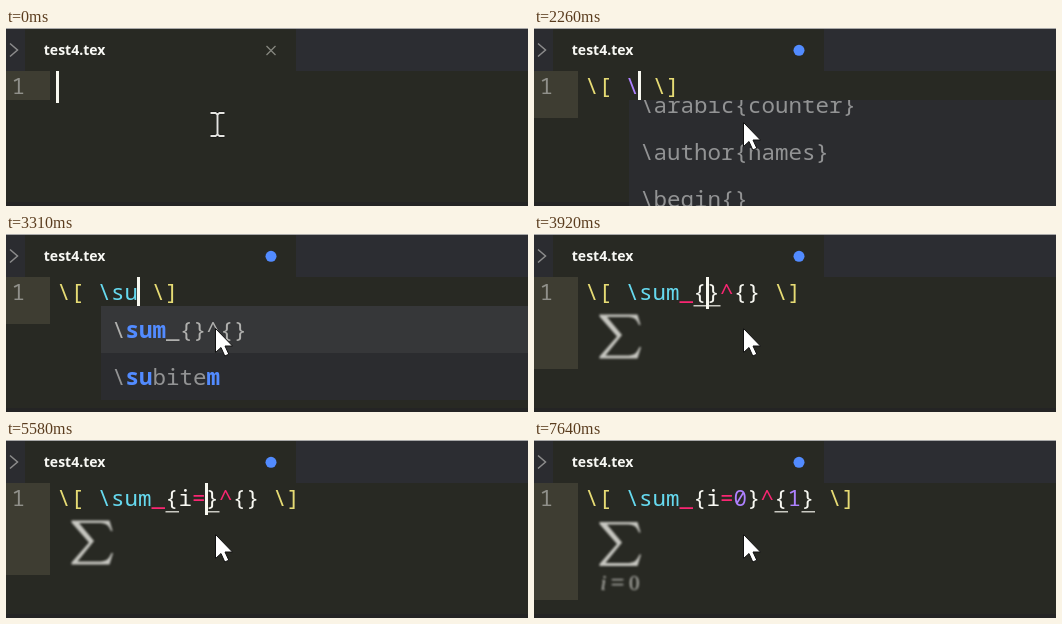
An HTML page that plays this animation: 522x178 px, repeating every 8 s.

```html
<!DOCTYPE html>
<html lang="en">
<head>
<meta charset="utf-8">
<title>Editor typing a sum</title>
<style>
  html, body { margin: 0; width: 100%; height: 100%; overflow: hidden; background: #282923; }
  svg { display: block; }
  text { white-space: pre; }
  .code { font: 500 22.5px "Noto Sans Mono", "DejaVu Sans Mono", monospace; }
  .tab { font: bold 14px "Open Sans", "Noto Sans", sans-serif; fill: #f8f8f4; }
  .hit { font-weight: bold; fill: #528bff; }
  .math { font: 21px "Liberation Serif", "Noto Serif", serif; fill: #bcbcb6; }
  .soft { filter: blur(.8px); }
</style>
</head>
<body>
<svg width="522" height="178" viewBox="0 0 522 178">
  <rect width="522" height="178" fill="#282923"/>
  <rect y="174" width="522" height="4" fill="#242424"/>
  <rect width="19" height="43" fill="#2b2c30"/>
  <rect x="290" width="232" height="43" fill="#2c2d32"/>
  <rect width="522" height="1" fill="#a8a8a8"/>
  <path d="M4 15.5 L11.5 22 L4 28.5" fill="none" stroke="#8c8c8c" stroke-width="1.5"/>
  <text class="tab" x="37.8" y="27">test4.tex</text>
  <path id="close" d="M260.5 18 L269.5 27 M269.5 18 L260.5 27" stroke="#85867f" stroke-width="1.3"/>
  <circle id="dot" cx="265" cy="22.3" r="5.5" fill="#528bff"/>
  <rect id="gutter" y="43" width="44" fill="#3e3d32"/>
  <text class="code" x="5.5" y="65.5" fill="#90908a">1</text>
  <g id="line" class="code"></g>
  <g id="marks" fill="#c9c9c2"></g>
  <rect id="caret" y="43" width="3" height="32" fill="#f8f8f0"/>
  <g id="sum" class="soft">
    <path fill="#c6c6c0" d="M65.5 80.5 H103.5 L106.5 91 H105 C102.5 84.5 99.5 83 91.5 83 H73 L88 101 L71.5 121.5 H92.5 C100.5 121.5 102.5 119.5 105.5 113 H107 L103.5 124.5 H65.5 V122.5 L83 102.5 L65.5 82.5 Z"/>
  </g>
  <g id="limit" class="math soft">
    <text x="66.5" y="150" font-style="italic">i</text>
    <text x="76.5" y="151" font-size="25">=</text>
    <text x="95" y="150">0</text>
  </g>
  <g id="popup"></g>
  <g id="beam" fill="none" transform="translate(-.5 -.5)">
    <path d="M205 85.5 H210 L212 87 L214 85.5 H219 M212 87 V107 M205 108.5 H210 L212 107 L214 108.5 H219" stroke="#111" stroke-width="3"/>
    <path d="M205 85.5 H210 L212 87 L214 85.5 H219 M212 87 V107 M205 108.5 H210 L212 107 L214 108.5 H219" stroke="#e4e4e0" stroke-width="2"/>
  </g>
  <path id="arrow" d="M209.5 94.5 V118.5 L215 113.5 L218.8 122 L222.8 120.2 L219 112 H226.5 Z" fill="#fff" stroke="#111" stroke-width="1"/>
</svg>
<script>
const LOOP = 8000, CELL = 13.5, LEFT = 51, ROW = 47;
const $ = id => document.getElementById(id);
const show = (id, on) => $(id).setAttribute("visibility", on ? "visible" : "hidden");

const all = { rows: ["\\arabic{counter}", "\\author{names}", "\\begin{}"], key: "", base: 85 };
const forS = { rows: ["\\samepage", "\\scriptsize", "\\section{}"], key: "s", base: 85 };
const forSu = { rows: ["\\subitem", "\\subsubsection[short]{title}", "\\subsection{}"], key: "su", base: 85 };
const forSum = { rows: ["\\sum_{}^{}", "\\subitem"], key: "sum", base: 104, picked: true };

// Each step changes only the listed parts of the state.
const steps = [
  [0, { line: "", at: 0, caret: 1, dirty: false, arrow: false, popup: null, bottom: 72, marks: [], sum: false, limit: false }],
  [450, { line: "\\", at: 1, dirty: true }],
  [520, { popup: all, arrow: true }],
  [740, { line: "\\[\\]", at: 2, popup: null, arrow: false }],
  [1120, { caret: .7 }],
  [1200, { line: "\\[ \\]", at: 3, caret: 1 }],
  [1510, { line: "\\[  \\]", at: 4 }],
  [1740, { at: 3 }],
  [2110, { line: "\\[ \\ \\]", at: 4 }],
  [2180, { popup: all, arrow: true }],
  [2260, { bottom: 90 }],
  [2560, { line: "\\[ \\s \\]", at: 5, popup: forS }],
  [2950, { caret: .7 }],
  [3020, { popup: forSu, caret: 1 }],
  [3090, { line: "\\[ \\su \\]", at: 6 }],
  [3310, { popup: forSum }],
  [3390, { line: "\\[ \\sum \\]", at: 7 }],
  [3710, { line: "\\[ \\sum_{}^{} \\]", at: 9, popup: null }],
  [3800, { marks: [8, 9] }],
  [3900, { sum: true, bottom: 135 }],
  [4380, { caret: .75 }], [4460, { caret: .5 }], [4530, { caret: .25 }], [4610, { caret: 0 }],
  [4990, { caret: .4 }], [5080, { caret: 1 }],
  [5190, { line: "\\[ \\sum_{i}^{} \\]", at: 10, marks: [8, 10] }],
  [5580, { line: "\\[ \\sum_{i=}^{} \\]", at: 11, marks: [8, 11] }],
  [5810, { line: "\\[ \\sum_{i=0}^{} \\]", at: 12, marks: [8, 12] }],
  [6180, { caret: .7 }], [6260, { caret: .35 }],
  [6410, { caret: 0, limit: true, bottom: 160 }],
  [6730, { caret: 1, at: 15, marks: [14, 15] }],
  [7100, { line: "\\[ \\sum_{i=0}^{1} \\]", at: 16 }],
  [7190, { marks: [14, 16] }],
  [7500, { caret: .65 }], [7570, { caret: .3 }], [7640, { caret: 0 }]
];

let last = {};
const states = steps.map(([time, change]) => (last = { ...last, ...change, time }));

function colour(token, start) {
  if (/^\\[[\]]/.test(token)) return "#e6db74";
  if (/^\\[a-z]/.test(token)) return "#66d9ef";
  if (/[_^=]/.test(token)) return "#f92672";
  if (/\d/.test(token) || (token === "\\" && start)) return "#ae81ff";
  return "#f8f8f2";
}

function lineMarkup(line) {
  return [...line.matchAll(/\\[[\]]|\\[a-z]+|\S/g)].map(m =>
    `<text x="${LEFT + m.index * CELL}" y="65.5" fill="${colour(m[0], m.index)}">${m[0]}</text>`).join("");
}

function rowMarkup(row, key) {
  let k = 0;
  return [...row].map(c => c === key[k] ? (k++, `<tspan class="hit">${c}</tspan>`) : c).join("");
}

function popupMarkup({ rows, key, base, picked }, column) {
  const x = 54.5 + column * CELL;
  const height = picked ? rows.length * ROW : 106;
  const texts = rows.map((row, i) =>
    `<text x="11" y="${base - 72 + i * ROW}" fill="${picked && !i ? "#b0b0ae" : "#929394"}">${rowMarkup(row, key)}</text>`);
  return `<svg class="code" x="${x}" y="72" width="${522 - x}" height="${height}" overflow="hidden">
    <rect width="522" height="${height}" fill="#2b2c2f"/>
    ${picked ? `<rect width="522" height="${ROW}" fill="#363739"/>` : ""}${texts.join("")}</svg>`;
}

function draw(s) {
  show("close", !s.dirty);
  show("dot", s.dirty);
  show("beam", !s.arrow);
  show("arrow", s.arrow);
  show("sum", s.sum);
  show("limit", s.limit);
  $("sum").setAttribute("transform", `translate(0 ${s.limit ? 1.5 : 0})`);
  $("gutter").setAttribute("height", s.bottom - 43);
  $("line").innerHTML = lineMarkup(s.line);
  $("marks").innerHTML = s.marks.map(i =>
    `<rect x="${LEFT + i * CELL + .5}" y="71" width="13.5" height="1.5"/>`).join("");
  $("caret").setAttribute("x", Math.floor(50.5 + s.at * CELL));
  $("caret").setAttribute("opacity", s.caret);
  $("popup").innerHTML = s.popup ? popupMarkup(s.popup, Math.max(0, s.line.lastIndexOf("\\", s.at - 1))) : "";
}

let current = null;
const begin = performance.now();
function tick(now) {
  const t = Math.max(0, now - begin) % LOOP;
  const state = states.findLast(s => s.time <= t);
  if (state !== current) draw(current = state);
  requestAnimationFrame(tick);
}
tick(begin);
</script>
</body>
</html>
```
